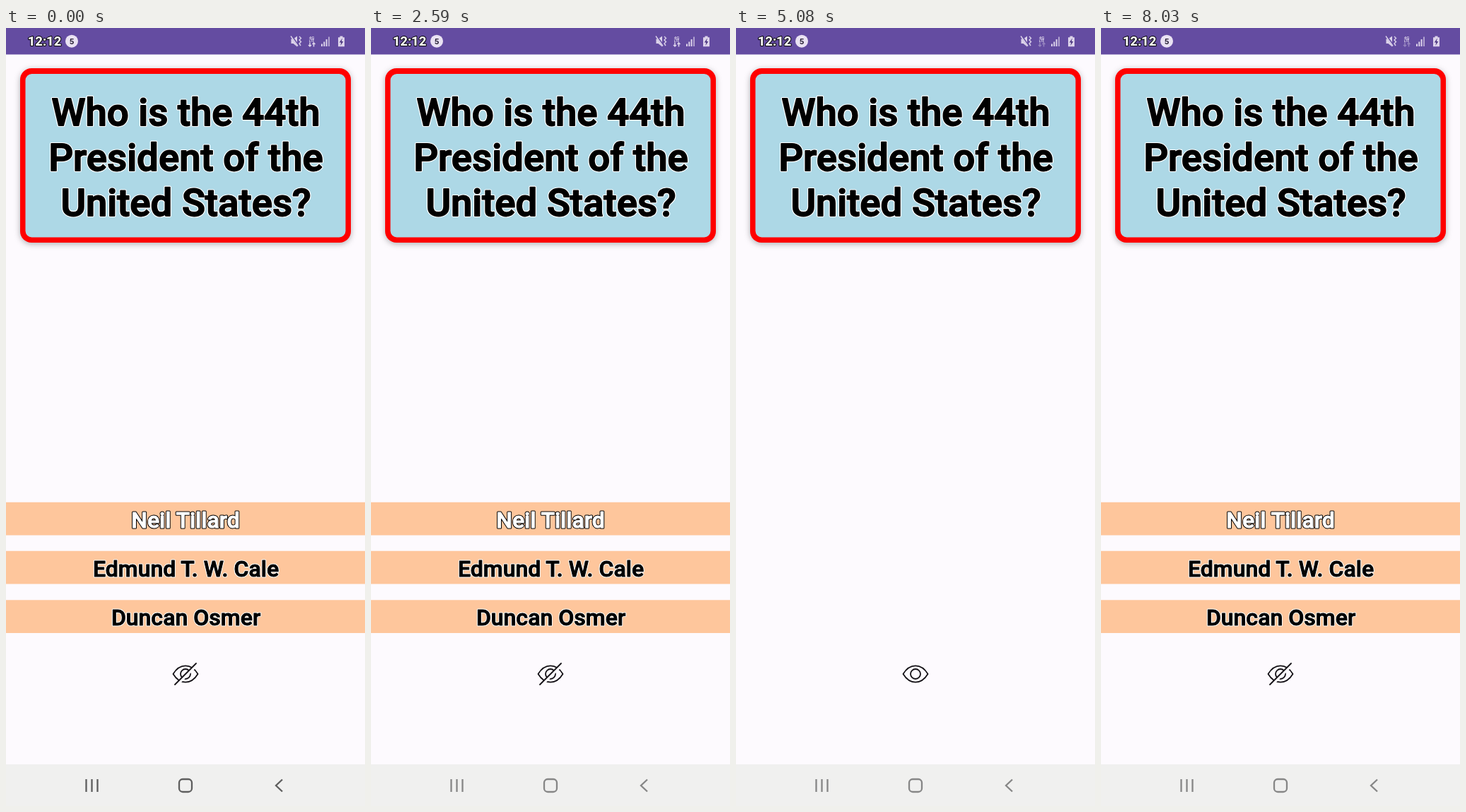
Recreate the animation shown at these times as an HTML page. Size 508 by 1102 pixels, loop 8.36 s.

```html
<!DOCTYPE html>
<html lang="en">
<head>
<meta charset="utf-8">
<title>Quiz card</title>
<style>
  html, body { margin: 0; width: 100%; height: 100%; overflow: hidden; background: #fdfafe; }
  svg { display: block; width: 100%; height: 100%; }
  text { font-family: Roboto, "Open Sans", sans-serif; font-weight: 500; text-anchor: middle; }
  .small { font-weight: 700; }

  /* each text is drawn twice: a wide halo, then a thickened face */
  .halo { fill: #fff; stroke: #fff; stroke-width: calc(var(--bold) + var(--rim)); stroke-linejoin: round; }
  .face { fill: #000; stroke: #000; stroke-width: var(--bold); stroke-linejoin: round; }
  .picked .halo { fill: #000; stroke: #000; }
  .picked .face { fill: #fff; stroke: #fff; }
  .question { font-size: 54.5px; --bold: 1.8px; --rim: 2.4px; }
  .answer { font-size: 61px; --bold: 2px; --rim: 3px; }
  .choice { font-size: 32px; --bold: 1px; --rim: 2px; }
  .clock { font-size: 18.5px; --bold: .2px; --rim: 2px; }

  .line { fill: none; stroke: #151217; stroke-width: 1.8; stroke-linecap: round; stroke-linejoin: round; }
  .card { filter: drop-shadow(0 2px 4px rgba(0, 0, 0, .3)); }
  .nav { fill: none; stroke: #868686; stroke-width: 2.3; animation: settle 8360ms linear infinite; }
  .front, .back, .list, .shut, .open, .data { animation: 8360ms step-end infinite; }
  .front { animation-name: front; }
  .back { animation-name: back; }
  .list, .shut { animation-name: list; }
  .open { animation-name: open; }
  .data { animation-name: data; }

  @keyframes front {
    0%, 30.98%, 77.27% { opacity: 1; }
    19.97%, 66.74% { opacity: 0; }
  }
  @keyframes back {
    0%, 30.98%, 77.27% { opacity: 0; }
    19.97%, 66.74% { opacity: 1; }
  }
  @keyframes list {
    0%, 49.4%, 85.04% { opacity: 1; }
    41.74%, 60.76% { opacity: 0; }
  }
  @keyframes open {
    0%, 49.4%, 85.04% { opacity: 0; }
    41.74%, 60.76% { opacity: 1; }
  }
  @keyframes data {
    0%, 79.9% { opacity: 1; }
    41.74%, 92.1% { opacity: .4; }
  }
  @keyframes settle {
    0%, .24% { stroke: #5e5e5e; }
    2.5%, 100% { stroke: #868686; }
  }
</style>
</head>
<body>
<svg viewBox="0 0 508 1102" preserveAspectRatio="none">
  <defs>
    <path id="eye" d="M236.5 915C246 899.5 262 899.5 271.5 915C262 930.5 246 930.5 236.5 915Z"/>
    <text id="time" x="54.5" y="25.2" class="small">12:12</text>
    <g id="ask">
      <text x="254.5" y="138">Who is the 44th</text>
      <text x="254.5" y="202">President of the</text>
      <text x="254.5" y="265.5">United States?</text>
    </g>
    <text id="reply" x="254.5" y="527.5">Duncan Osmer</text>
    <text id="first" x="254" y="708">Neil Tillard</text>
    <g id="rest">
      <text x="254.5" y="777">Edmund T. W. Cale</text>
      <text x="254.5" y="846">Duncan Osmer</text>
    </g>
  </defs>

  <rect width="508" height="1102" fill="#fdfafe"/>

  <!-- status bar -->
  <rect width="508" height="37.5" fill="#644ca1"/>
  <g class="clock picked">
    <use href="#time" class="halo"/>
    <use href="#time" class="face"/>
  </g>
  <circle cx="93" cy="18.7" r="9" fill="#e9e2f3"/>
  <text x="93" y="22.7" font-size="11.5" fill="#2b2338" class="small">5</text>
  <g fill="#dcd3ea">
    <path d="M403.5 15.5h3l5.500-4v15l-5.500-4.500h-3z"/>
    <path d="M404 11.500l10 14" fill="none" stroke="#644ca1" stroke-width="3"/>
    <path d="M403 11.500l10 14M415 12l2.500 2.500-2.500 2.500 2.500 2.500-2.500 2.500 2 3" fill="none" stroke="#dcd3ea" stroke-width="1.400"/>
    <text x="432.500" y="15.500" font-size="6" class="small">4G</text>
    <text x="432.500" y="19.800" font-size="4.500" class="small">LTE</text>
    <path class="data" d="M430 20.500v5.500m-2-2 2 2 2-2M435.500 26.500v-5.500m-2 2 2-2 2 2" fill="none" stroke="#dcd3ea" stroke-width="1.500"/>
    <path d="M446 22.500h2v3.500h-2zM449.300 19.500h2v6.500h-2zM452.600 16h2v10h-2z"/>
    <path d="M456 12.500h2v13.500h-2z" opacity=".65"/>
    <path d="M472.500 11.500h4v1.800h2.500v13h-9v-13h2.500z"/>
    <path d="M475.800 14.500l-4 6h2.500l-1 4.500 4-6h-2.500z" fill="#49347f"/>
  </g>

  <!-- question side -->
  <g class="front">
    <rect class="card" x="20" y="57" width="468" height="247" rx="16" fill="#f00"/>
    <rect x="27.5" y="65" width="453" height="231.5" rx="9" fill="#add8e6"/>
    <g class="question">
      <use href="#ask" class="halo"/>
      <use href="#ask" class="face"/>
    </g>
  </g>

  <!-- answer side -->
  <g class="back">
    <rect y="379.7" width="508" height="247.6" fill="#00f"/>
    <g class="answer">
      <use href="#reply" class="halo"/>
      <use href="#reply" class="face"/>
    </g>
  </g>

  <!-- choices -->
  <g class="list">
    <path d="M0 671.7h508v46.800H0zM0 740.800h508v46.800H0zM0 810.200h508v46.800H0z" fill="#fec69c"/>
    <g class="choice picked">
      <use href="#first" class="halo"/>
      <use href="#first" class="face"/>
    </g>
    <g class="choice">
      <use href="#rest" class="halo"/>
      <use href="#rest" class="face"/>
    </g>
  </g>

  <!-- visibility toggle -->
  <g class="line open">
    <use href="#eye"/>
    <circle cx="254" cy="915" r="7"/>
  </g>
  <g class="line shut">
    <use href="#eye"/>
    <circle cx="254" cy="915" r="7"/>
    <path d="M241 931L271 901" stroke="#fdfafe" stroke-width="4"/>
    <path d="M239 930L269 900"/>
  </g>

  <!-- navigation bar -->
  <rect y="1043" width="508" height="59" fill="#f0f0ef"/>
  <g class="nav">
    <path d="M113.500 1064v18M121.500 1064v18M129.500 1064v18"/>
    <rect x="245" y="1064" width="18" height="18" rx="5"/>
    <path d="M391 1064.500l-9 8.500 9 8.500"/>
  </g>
</svg>
</body>
</html>
```
